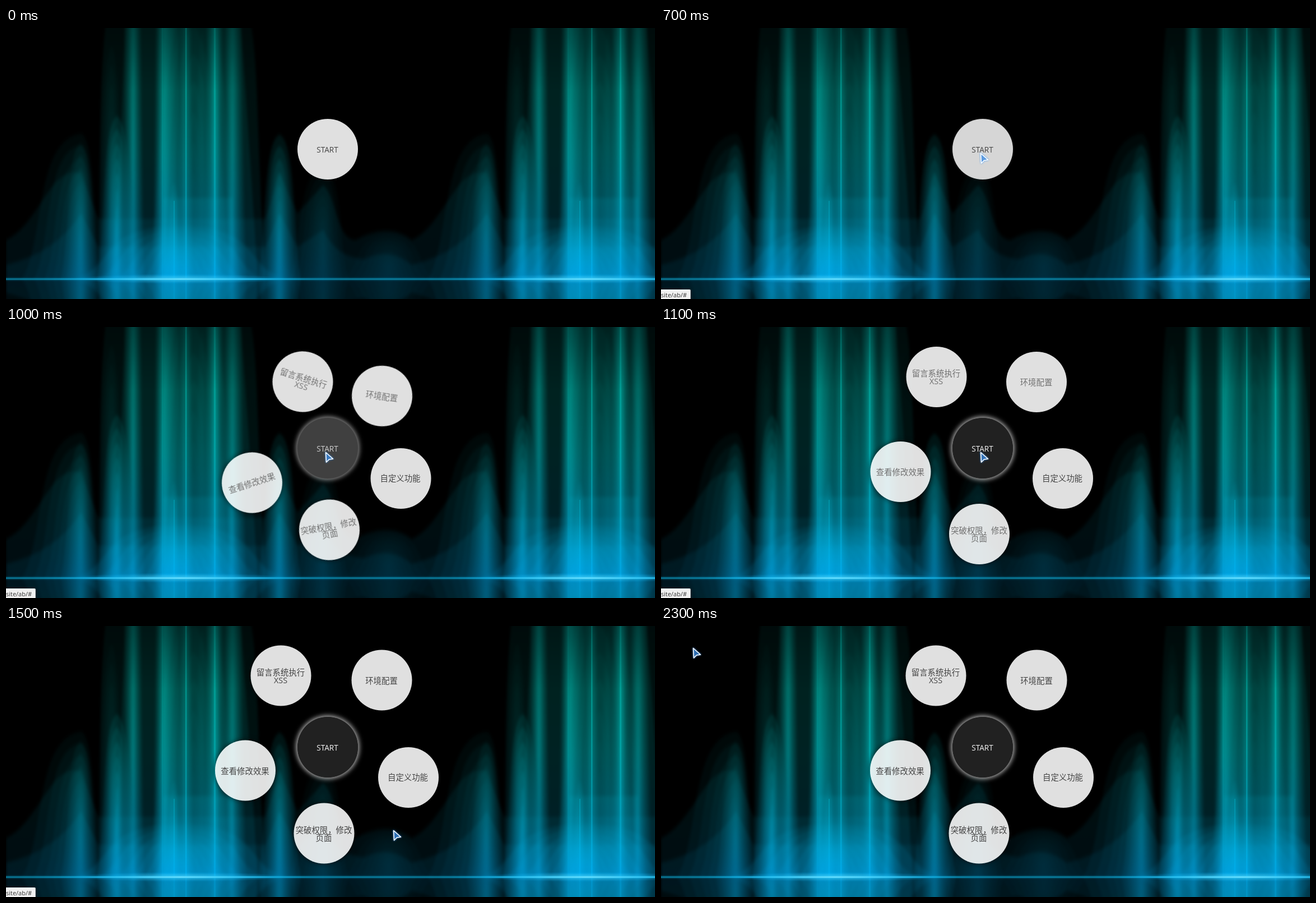
Recreate the animation shown at these times as an HTML page without scripts. Size 1158 px wide and 483 px high, loop 2400 ms.

```html
<!DOCTYPE html>
<html lang="zh">
<head>
<meta charset="utf-8">
<title>Radial menu</title>
<style>
  html, body { margin: 0; width: 100%; height: 100%; overflow: hidden; background: #000; }
  body { font: 14.4px/14.4px "Open Sans", "Noto Sans CJK SC", "Noto Sans CJK", sans-serif; }
  body > * { position: absolute; left: 0; top: 0; }
  .disc, .status, .cursor { animation: 2.4s step-end infinite; }

  .disc {
    width: 108px; height: 108px; margin: -53.5px 0 0 -53.5px; border-radius: 50%;
    display: flex; align-items: center; justify-content: center;
    text-align: center; white-space: nowrap;
  }
  .disc span { position: relative; top: 1px; left: -.5px; }
  .start { left: 573.5px; top: 215.5px; font-size: 13.6px; animation-name: start; }
  .item {
    background: rgba(255, 255, 255, .88); color: #444;
    box-shadow: 0 0 10px rgba(0, 0, 0, .75); animation-name: fly;
  }
  .item:not(.lead) span { animation: ink 2.4s step-end infinite; }
  .status {
    top: 466px; width: 52px; height: 17px; overflow: hidden; white-space: nowrap;
    background: #f1f1f1; color: #333; border-right: 1px solid #bbb; border-radius: 0 2px 0 0;
    font-size: 11px; line-height: 20px; animation-name: status;
  }
  .cursor { overflow: visible; filter: drop-shadow(0 0 1.5px #3b9cff); animation-name: cursor; }

  @keyframes start {
    0%     { background: #e0e0e0; color: #444; box-shadow: none; }
    29.16% { background: #d6d6d6; color: #444; box-shadow: 0 0 4px rgba(255, 255, 255, .1); }
    33.32% { background: #bfbfbf; color: #555; box-shadow: 0 0 7px rgba(255, 255, 255, .22); }
    41.65% { background: #404040; color: #ccc; box-shadow: 0 0 0 1px #555, 0 0 8px 2px rgba(255, 255, 255, .6); }
    45.82%, 100% {
      background: rgba(36, 36, 36, .92); color: #f4f4f4;
      box-shadow: 0 0 0 1.5px #6a6a6a, 0 0 8px 2px rgba(255, 255, 255, .75);
    }
  }
  @keyframes fly {
    0%     { transform: translate(573.5px, 215.5px); visibility: hidden; }
    33.32% { transform: var(--out); visibility: visible; }
    41.65% { transform: var(--spin); }
    45.82% { transform: var(--near); }
    49.99%, 100% { transform: var(--rest); visibility: visible; }
  }
  @keyframes ink {
    0% { color: #444; }
    41.65% { color: #707070; }
    49.99%, 100% { color: #444; }
  }
  @keyframes status {
    0% { opacity: 0; }
    16.65% { opacity: .83; }
    20.82% { opacity: 1; }
    70.82%, 100% { opacity: 0; }
  }
  @keyframes cursor {
    0%     { transform: translate(-40px, 120px); }
    4.15%  { transform: translate(2px, 130px); }
    8.32%  { transform: translate(290px, 190px); }
    12.49% { transform: translate(510px, 232px); }
    16.65% { transform: translate(578px, 225px); }
    20.82% { transform: translate(574px, 223px); }
    24.99% { transform: translate(570px, 223px); }
    54.15% { transform: translate(585px, 241px); }
    58.32% { transform: translate(650px, 310px); }
    62.49% { transform: translate(691px, 364px); }
    66.65% { transform: translate(640px, 420px); }
    70.82% { transform: translate(580px, 462px); }
    91.65% { transform: translate(48px, 66px); }
    95.82%, 100% { transform: translate(57px, 39px); }
  }
</style>
</head>
<body>
<svg width="1158" height="483" viewBox="0 0 1158 483">
  <defs>
    <linearGradient id="tint" gradientUnits="userSpaceOnUse" x1="0" y1="0" x2="0" y2="447">
      <stop offset="0" stop-color="#008c84"/>
      <stop offset=".25" stop-color="#00d2c6"/>
      <stop offset=".5" stop-color="#00d4d8"/>
      <stop offset=".75" stop-color="#00c4e6"/>
      <stop offset="1" stop-color="#00b8ff"/>
    </linearGradient>
    <radialGradient id="flare">
      <stop offset="0" stop-color="#7fe8ff"/>
      <stop offset=".5" stop-color="#3cd0ff" stop-opacity=".6"/>
      <stop offset="1" stop-color="#00b4ff" stop-opacity="0"/>
    </radialGradient>
    <filter id="soft" filterUnits="userSpaceOnUse" x="-20" y="-20" width="1200" height="520">
      <feGaussianBlur stdDeviation="2 3"/>
    </filter>

    <!-- unit half bell, then nested copies that brighten towards the core -->
    <path id="half" d="M0 .15V-1C.8-.95 .62-.25 1 0V.15z"/>
    <g id="side" fill="#fff" fill-opacity=".1">
      <use href="#half"/>
      <use href="#half" transform="scale(.8 .92)"/>
      <use href="#half" transform="scale(.62 .83)"/>
      <use href="#half" transform="scale(.48 .74)"/>
      <use href="#half" transform="scale(.36 .65)"/>
      <use href="#half" transform="scale(.26 .55)"/>
      <use href="#half" transform="scale(.18 .45)"/>
      <use href="#half" transform="scale(.1 .35)"/>
    </g>
    <g id="bell"><use href="#side"/><use href="#side" transform="scale(-1 1)"/></g>

    <g id="wave">
      <g fill="#fff">
        <path fill-opacity=".08" d="M164 460C170 300 164 120 178-10H436C452 60 448 250 464 460z"/>
        <path fill-opacity=".09" d="M186 460Q208 200 212-20H418Q434 200 450 460z"/>
        <path fill-opacity=".1" d="M280 303H405V460H280z"/>
        <path fill-opacity=".07" d="M0 378C60 350 80 240 134 260L165 340H463L488 260 520 330 566 280C590 300 590 378 624 378Q683 345 724 378V460H0z"/>
        <path fill-opacity=".07" d="M0 422Q90 400 134 330L165 390H463L488 330 520 390 566 360Q590 410 640 412 683 390 724 422V460H0z"/>
      </g>
      <use href="#side" transform="translate(134 447) scale(-105 259)" opacity=".45"/>
      <use href="#side" transform="translate(134 447) scale(34 259)" opacity=".45"/>
      <use href="#bell" transform="translate(133 447) scale(33 240)" opacity=".55"/>
      <use href="#bell" transform="translate(188 447) scale(24 415)" opacity=".25"/>
      <use href="#bell" transform="translate(198 447) scale(34 290)"/>
      <use href="#bell" transform="translate(227 447) scale(20 880)" opacity=".85"/>
      <use href="#side" transform="translate(281 447) scale(-19 950)"/>
      <use href="#side" transform="translate(281 447) scale(46 950)"/>
      <use href="#bell" transform="translate(335 447) scale(85 540)" opacity=".45"/>
      <use href="#bell" transform="translate(300 447) scale(16 170)" opacity=".7"/>
      <use href="#bell" transform="translate(321 447) scale(14 850)" opacity=".6"/>
      <use href="#bell" transform="translate(351 447) scale(18 440)" opacity=".3"/>
      <use href="#bell" transform="translate(373 447) scale(21 1000)"/>
      <use href="#bell" transform="translate(404 447) scale(25 720)" opacity=".85"/>
      <use href="#bell" transform="translate(310 447) scale(185 95)" opacity=".9"/>
      <use href="#bell" transform="translate(488 447) scale(38 257)" opacity=".95"/>
      <use href="#side" transform="translate(566 447) scale(-60 200)" opacity=".3"/>
      <use href="#side" transform="translate(566 447) scale(45 200)" opacity=".3"/>
      <use href="#bell" transform="translate(683 447) scale(80 80)" opacity=".2"/>
    </g>
    <g id="threads" fill="#fff">
      <path fill-opacity=".4" d="M320 0h2.5V447h-2.5z"/>
      <path fill-opacity=".3" d="M371 0h3V447h-3z"/>
      <path fill-opacity=".3" d="M299 308h2V447h-2z"/>
      <path fill-opacity=".12" d="M278 0h2V447h-2z"/>
    </g>
    <mask id="light" maskUnits="userSpaceOnUse" x="0" y="0" width="1158" height="447">
      <g filter="url(#soft)"><use href="#wave"/><use href="#wave" x="724"/></g>
      <use href="#threads"/><use href="#threads" x="724"/>
    </mask>
    <g id="glow"><path fill="url(#tint)" mask="url(#light)" d="M0 0H1158V447H0z"/></g>
    <g id="spark">
      <ellipse cx="310" cy="447" rx="190" ry="9" fill="url(#flare)" opacity=".55"/>
      <ellipse cx="310" cy="447.5" rx="260" ry="2.5" fill="url(#flare)"/>
    </g>
  </defs>

  <path d="M0 0H1158V483H0z"/>
  <use href="#glow"/>
  <use href="#glow" transform="matrix(1 0 0 -1 0 894)" opacity=".88"/>
  <path fill="#00a8d8" opacity=".15" d="M0 444H1158V451H0z"/>
  <path fill="#10b4e0" opacity=".5" d="M0 446H1158V449H0z"/>
  <use href="#spark"/><use href="#spark" x="724"/>
</svg>

<div class="disc start"><span>START</span></div>
<div class="disc item" style="--out: translate(621px, 292px) rotate(-67deg); --spin: translate(576px, 360.5px) rotate(-10deg); --near: translate(567px, 368px); --rest: translate(566.5px, 368.5px)"><span>突破权限，修改<br>页面</span></div>
<div class="disc item" style="--out: translate(590.5px, 294.5px) rotate(-120deg); --spin: translate(438px, 276.5px) rotate(-18deg); --near: translate(426.5px, 257px); --rest: translate(426px, 256.5px)"><span>查看修改效果</span></div>
<div class="disc item" style="--out: translate(632px, 235.5px) rotate(110deg); --spin: translate(528.5px, 96.5px) rotate(17deg); --near: translate(490.5px, 88px); --rest: translate(489.5px, 87.5px)"><span>留言系统执行<br>XSS</span></div>
<div class="disc item" style="--out: translate(640.5px, 243.5px) rotate(55deg); --spin: translate(670px, 122px) rotate(8deg); --near: translate(669px, 97px); --rest: translate(669.5px, 95.5px)"><span>环境配置</span></div>
<div class="disc item lead" style="--out: translate(641.5px, 269px); --spin: translate(703.5px, 269px); --near: translate(716px, 269px); --rest: translate(717px, 269px)"><span>自定义功能</span></div>

<div class="status">site/ab/#</div>
<svg class="cursor" width="16" height="20">
  <path d="M.5 .5L13.5 12 6.5 13 1.5 18z" fill="#3c82d2" fill-opacity=".5" stroke="#fff" stroke-width="1.6" stroke-linejoin="round"/>
</svg>
</body>
</html>
```
